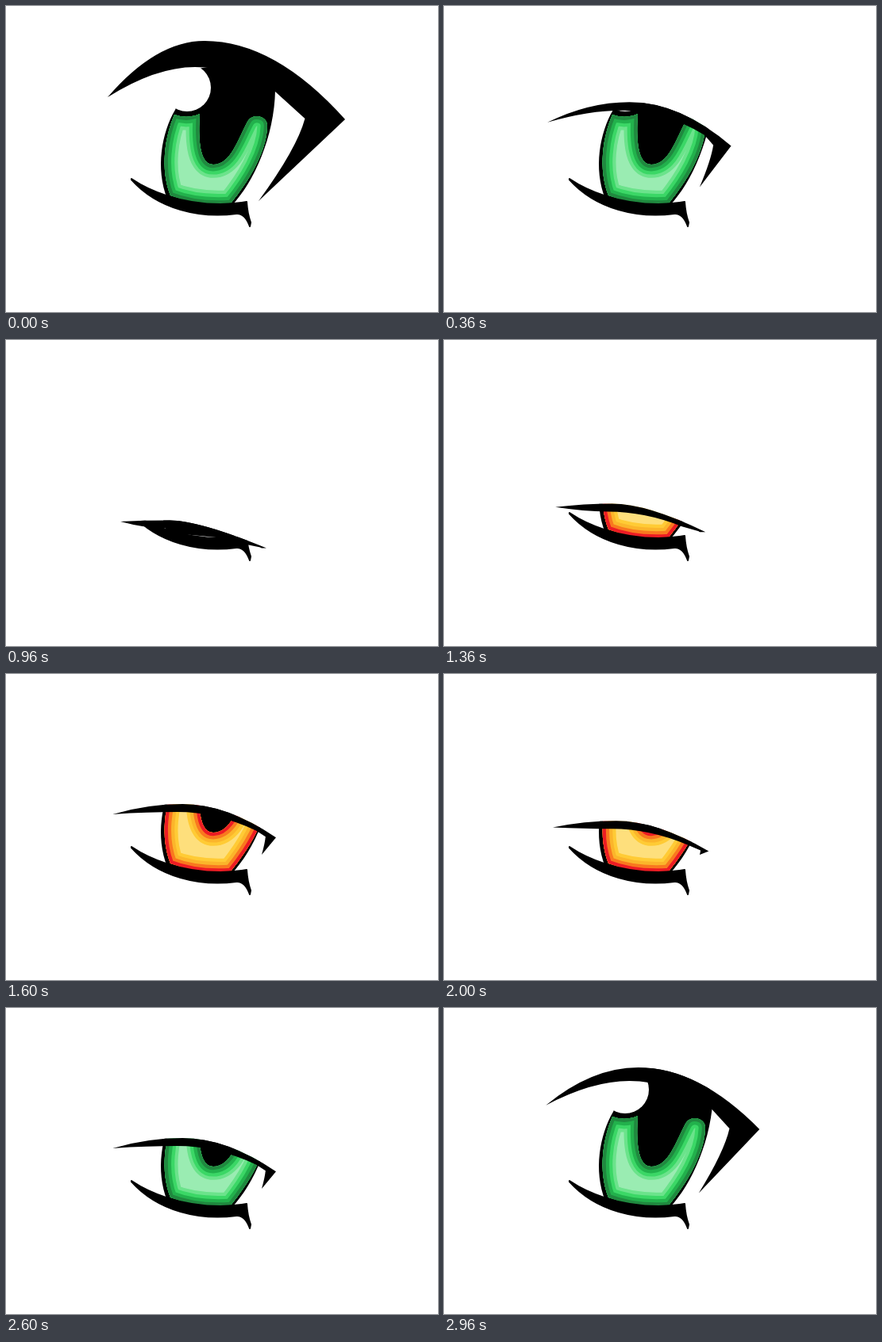
An HTML page with a canvas that plays this animation: 544 px wide and 386 px high, repeating every 3.08 s.

```html
<!DOCTYPE html>
<html lang="en">
<head>
<meta charset="utf-8">
<title>Blinking eye</title>
<style>
html, body { margin: 0; width: 100%; height: 100%; overflow: hidden; background: #fff; }
canvas { display: block; }
</style>
</head>
<body>
<canvas id="stage" width="544" height="386"></canvas>
<script>
const ctx = document.getElementById('stage').getContext('2d');
ctx.lineJoin = 'round';

const GREEN = ['#20893f', '#22b14c', '#3bd766', '#6be38b', '#9aecb2'];
const ORANGE = ['#ed1c24', '#f9781f', '#fbb52b', '#ffcb35', '#fedf7c'];
const BAND = 4.2;
const CLOSED = 8;

const iris = new Path2D('M213 131C196 160 188 205 203 243L285 251C312 222 338 165 339 106L300 70L235 80Z');
const ring = new Path2D('M212 137C200 165 194 205 207 239Q240 252 283 249C305 222 328 185 329 152C330 138 310 134 304 146C292 168 283 200 261 200C243 200 242 165 244 136Q228 143 212 137Z');
const lowerLid = new Path2D('M158 218C180 233 220 250 270 250Q292 249 303 247Q304 262 308 273L307 278Q301 261 290 262C245 268 192 257 158 219Z');
const highlight = new Path2D();
highlight.arc(228, 103, 30, 0, 7);

function fill(path, color) {
  ctx.fillStyle = color;
  ctx.fill(path);
}

function stroke(path, color, width) {
  ctx.strokeStyle = color;
  ctx.lineWidth = width;
  ctx.stroke(path);
}

// Upper lid at a step from wide open (0) to closed (8).
function upperLid(step) {
  const shut = step / CLOSED;
  const wide = (1 - shut) ** 2;
  const jolt = .3 ** step; // the first step moves further than the others

  const tipX = 128 + 16 * shut ** 2;
  const tipY = 115 + 114 * shut ** 1.3;
  const crestX = 250 - 44 * shut;
  const crestY = 58 + 21.2 * step - 14 * jolt;
  const cornerX = 328 + 85 * wide + 14 * jolt;
  const cornerY = crestY + 35 + 51 * wide + 13 * jolt;
  const tailX = 322 - 4 * jolt;
  const tailY = Math.max(228 + 18 * jolt, cornerY);
  const innerX = cornerX - 8 - .43 * (cornerX - 328);
  const innerY = cornerY - 1;
  const jointX = 339 - 48 * shut ** 1.5;
  const jointY = cornerY - 7 - 28 * (1 - shut) ** 3;
  const archX = 238 - 36 * shut;
  const archY = crestY + 10 + 23 * jolt;

  const bendX = crestX + (.5 - .2 * shut ** 4) * (cornerX - crestX);
  const top = `M${tipX} ${tipY}Q${(tipX + crestX) / 2} ${crestY} ${crestX} ${crestY}
    Q${bendX} ${crestY} ${cornerX} ${cornerY}`;
  return {
    cover: new Path2D(`${top}H544V0H0V${tipY}Z`),
    lash: new Path2D(`${top}L${tailX} ${tailY}
      Q${innerX + .17 * (tailX - innerX)} ${innerY + .36 * (tailY - innerY)} ${innerX} ${innerY}
      L${jointX} ${jointY}Q${(jointX + archX) / 2} ${archY} ${archX} ${archY}
      Q${tipX + .55 * (archX - tipX)} ${archY} ${tipX} ${tipY}Z`)
  };
}

// Strokes along the ring's edge, clipped to its inside, leave nested bands.
function drawBands(colors) {
  ctx.save();
  ctx.clip(ring);
  fill(ring, colors.at(-1));
  for (let i = colors.length - 1; i > 0; i--) stroke(ring, colors[i - 1], 2 * BAND * i);
  ctx.restore();
}

function draw(step, colors) {
  const lid = upperLid(step);
  ctx.clearRect(0, 0, 544, 386);
  fill(iris, '#000');
  if (step < CLOSED) drawBands(colors);
  fill(highlight, '#fff');
  fill(lowerLid, '#000');
  stroke(lowerLid, '#000', 2);
  fill(lid.cover, '#fff');
  fill(lid.lash, '#000');
}

// Steps last 120 ms, apart from the two pauses.
const steps = [...'012345678765678765421'].map(Number);
const duration = i => i === 8 || i === 11 ? 400 : 120;
const LOOP = 3080;
const start = performance.now();

function tick() {
  let rest = (performance.now() - start) % LOOP;
  let i = 0;
  while (i < steps.length - 1 && rest >= duration(i)) rest -= duration(i++);
  draw(steps[i], i >= 8 && i < 14 ? ORANGE : GREEN);
  requestAnimationFrame(tick);
}
tick();
</script>
</body>
</html>
```
